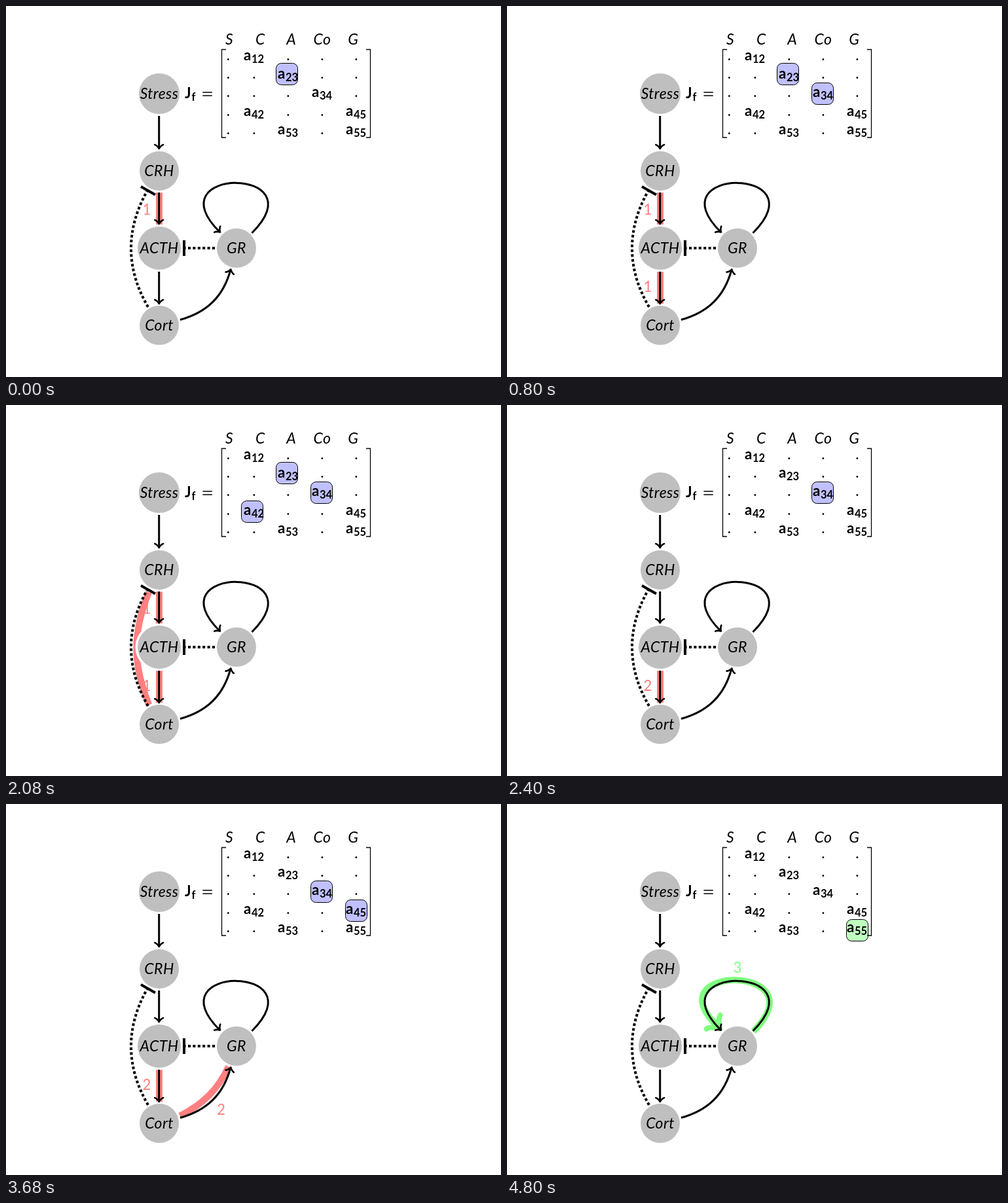
An HTML page that plays this animation: 756x567 px, repeating every 5600 ms.

```html
<!DOCTYPE html>
<html>
<head>
<meta charset="utf-8">
<style>
  html, body { margin: 0; width: 756px; height: 567px; overflow: hidden; background: #fff; }
  svg { display: block; }
  text { font: 22.3px Lato, sans-serif; text-anchor: middle; }
  .it { font-size: 23px; font-style: italic; letter-spacing: .4px; }
  .b { font-weight: 700; text-anchor: start; }
  .sub { font-size: 16.5px; }
  .eq { font: 24px "DejaVu Sans", sans-serif; stroke: #fff; stroke-width: .6; }
  path { fill: none; stroke: #000; }
  .edge { stroke-width: 3; }
  .tip { stroke-width: 2.6; stroke-linecap: round; stroke-linejoin: round; }
  .dots { stroke-width: 4; stroke-dasharray: 4 3.4; }
  .bar { stroke-width: 4; }
  .glow { stroke: #ff8080; stroke-width: 10; }
  .green { stroke: #80ff80; }
  .tip.green { stroke-width: 8; }
  .bracket { stroke-width: 1.3; }
</style>
</head>
<body>
<svg id="stage" width="756" height="567"></svg>
<script>
const STEP = 800, STEPS = 7;
const stage = document.getElementById('stage');
const timed = [];

function add(tag, attrs, text = '') {
  const el = document.createElementNS('http://www.w3.org/2000/svg', tag);
  for (const key in attrs) el.setAttribute(key, attrs[key]);
  el.textContent = text;
  return stage.appendChild(el);
}
const path = (d, cls) => add('path', { d, class: cls });
const label = (x, y, text, cls = '', fill = '#000') => add('text', { x, y, class: cls, fill }, text);
const during = (steps, ...els) => els.forEach(el => timed.push({ el, steps }));

// Curved arrowhead pointing along angle; size is a quarter of its half width
function tip(x, y, angle, size = 1.6, cls = 'tip') {
  const barb = side => [[-3.5, 2.5], [-.75, .25], [0, 0]]
    .map(([u, v]) => `${u * size} ${v * side * size}`).join(' ');
  const back = -3.75 * size, half = 4 * size;
  const el = path(`M${back} ${-half}C${barb(-1)}M${back} ${half}C${barb(1)}`, cls);
  el.setAttribute('transform', `translate(${x} ${y}) rotate(${angle})`);
}

const tipEl = (...args) => { tip(...args); return stage.lastChild; };

// Highlighted pathways, below nodes and edges
const number = (x, y, text, steps) => during(steps, label(x, y, text, '', '#ff8080'));
number(215, 319, '1', [0, 1, 2]);
number(215, 437, '1', [1, 2]);
number(215, 437, '2', [3, 4, 5]);
number(328.5, 475, '2', [4, 5]);
number(293, 358, '2', [5]);
during([0, 1, 2], path('M234 285V334', 'glow'));
during([1, 2, 3, 4, 5], path('M234 406V456', 'glow'));
during([2], path('M218 286C193 350 193 395 219 460', 'glow'));
during([4, 5], path('M265 477C301 459 324 436 340 401', 'glow'));
during([5], path('M272 370H320', 'glow'));
during([6],
  path('M376 348C480 244 219 244 323 341', 'glow green'),
  tipEl(325, 343, 45, 3.7, 'tip green'),
  label(352, 258, '3', '', '#80ff80'));

// Nodes
for (const [x, y, r, name] of [
  [234, 134, 31, 'Stress'], [234, 252, 30, 'CRH'], [234, 370, 33, 'ACTH'],
  [352, 370, 30, 'GR'], [234, 488, 30, 'Cort']
]) {
  add('circle', { cx: x, cy: y, r: r + 3.5, fill: '#fff' });
  add('circle', { cx: x, cy: y, r, fill: '#bfbfbf' });
  label(x, y + 7.5, name, 'it');
}

// Edges
for (const [from, to] of [[168, 218], [285, 333], [406, 455]]) {
  path(`M233.7 ${from}V${to}`, 'edge');
  tip(233.7, to, 90);
}
path('M266 479.5C307 468 332 444 343 403', 'edge');
tip(343.3, 402.5, -75);
path('M375.5 347C478 245 224 245 327 346', 'edge');
tip(327, 345.5, 45);
path('M319 370H272', 'dots');
path('M272 358V382', 'bar');
path('M217 460C182.5 401 182.5 341 216 282', 'dots');
path('M206 276L228 288.5', 'bar');

// Matrix
const box = (x, y, steps, fill = '#c0c0ff') =>
  during(steps, add('rect', { x, y, width: 33, height: 33, rx: 8, fill, stroke: '#000' }));
box(412.5, 87.5, [0, 1, 2]);
box(465.5, 117.5, [1, 2, 3, 4, 5]);
box(359.5, 146.5, [2]);
box(518.5, 146.5, [4, 5]);
box(412.5, 176.5, [5]);
box(518.5, 176.5, [6], '#c0ffc0');

['S', 'C', 'A', 'Co', 'G'].forEach((name, i) => label(341 + i * 47.3, 58.5, name, 'it'));
const columns = [339.5, 379, 431, 483, 535];
const filled = ['12', '23', '34', '42', '45', '53', '55'];
for (let row = 0; row < 5; row++) {
  columns.forEach((x, col) => {
    const y = 83 + row * 28.2, index = `${row + 1}${col + 1}`;
    if (filled.includes(index)) {
      label(x - 16, y, 'a', 'b');
      label(x - 4, y + 4, index, 'b sub');
    } else label(x, y, '.');
  });
}
label(273, 141, 'J', 'b');
label(283.5, 145, 'f', 'b sub');
label(307.5, 142, '=', 'eq');
path('M336 66.5H329.5V201H336M550 66.5H556.5V201H550', 'bracket');

function draw() {
  const step = Math.floor(performance.now() / STEP) % STEPS;
  for (const { el, steps } of timed) el.style.display = steps.includes(step) ? '' : 'none';
  requestAnimationFrame(draw);
}
draw();
</script>
</body>
</html>
```
